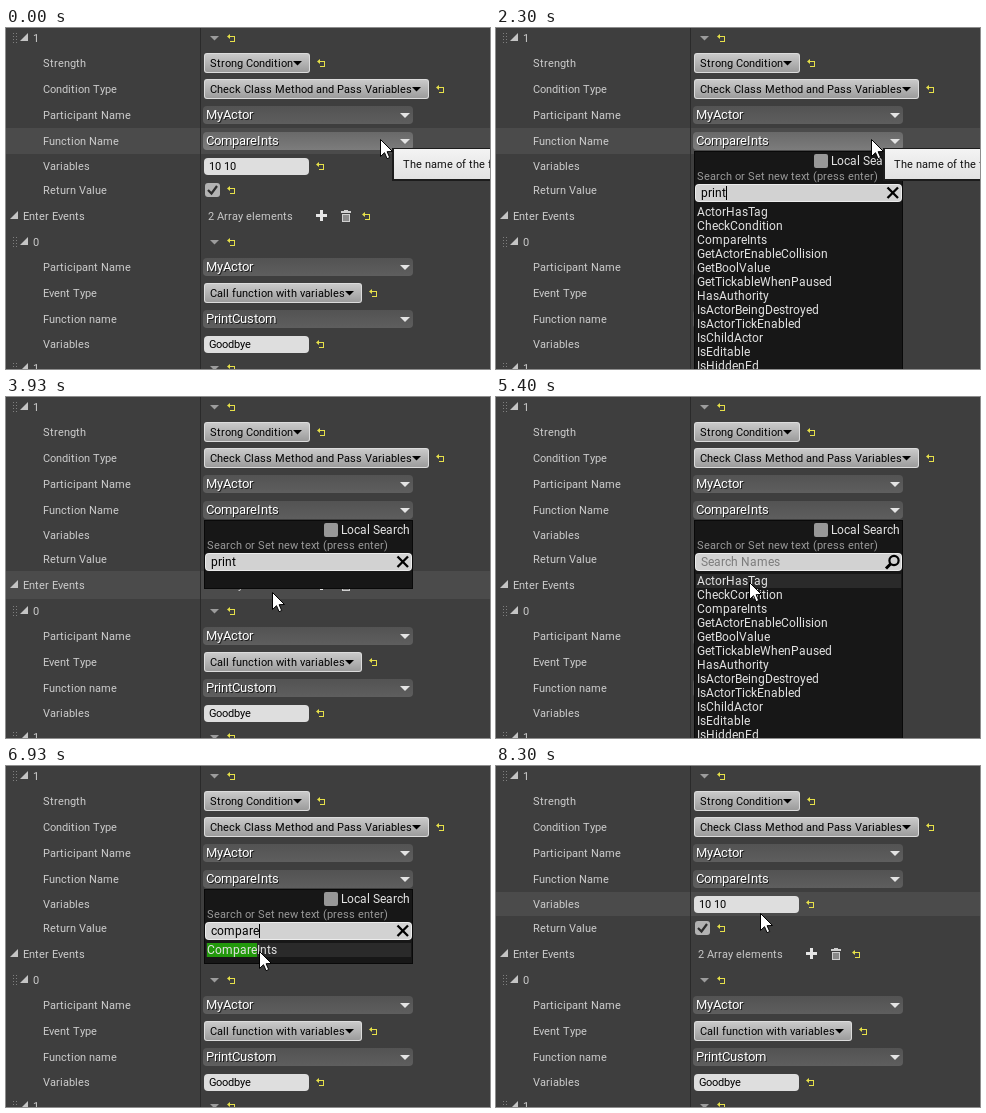
Animation, 484 px wide and 341 px high, one loop 8.66 s. Source, as an HTML page with a canvas:

```html
<!DOCTYPE html>
<html lang="en">
<head>
<meta charset="utf-8">
<title>Searchable function picker</title>
<style>
  html, body { margin: 0; width: 100%; height: 100%; overflow: hidden; background: #3e3e3e; }
  canvas { display: block; }
</style>
</head>
<body>
<canvas id="stage" width="484" height="341"></canvas>
<script>
const LOOP = 8660, W = 484, H = 341;
const ctx = document.getElementById('stage').getContext('2d');

const rowHeight = { header: 24, button: 26, combo: 26, input: 24, check: 24, array: 28 };
const indent = { header: 27, array: 17 };
const rows = [
  ['header', '1'],
  ['button', 'Strength', 'Strong Condition'],
  ['button', 'Condition Type', 'Check Class Method and Pass Variables'],
  ['combo', 'Participant Name', 'MyActor'],
  ['combo', 'Function Name', 'CompareInts'],
  ['input', 'Variables', '10 10'],
  ['check', 'Return Value'],
  ['array', 'Enter Events', '2 Array elements'],
  ['header', '0'],
  ['combo', 'Participant Name', 'MyActor'],
  ['button', 'Event Type', 'Call function with variables'],
  ['combo', 'Function name', 'PrintCustom'],
  ['input', 'Variables', 'Goodbye'],
  ['header', '1']
].map(([kind, label, value]) => ({ kind, label, value, h: rowHeight[kind] }));
rows.reduce((top, row) => {
  row.top = top;
  row.mid = top + row.h / 2;
  return top + row.h;
}, -2);

const items = ['ActorHasTag', 'CheckCondition', 'CompareInts', 'GetActorEnableCollision',
  'GetBoolValue', 'GetTickableWhenPaused', 'HasAuthority', 'IsActorBeingDestroyed',
  'IsActorTickEnabled', 'IsChildActor', 'IsEditable', 'IsHiddenEd'];

const within = (t, a, b) => t >= a && t < b;
const keysHit = (t, start, gap) => Math.max(0, 1 + Math.floor((t - start) / gap));

// What the search box holds: typed, deleted, typed again
function queryAt(t) {
  if (t < 1970) return 'CompareInts';
  if (t < 4600) return 'print'.slice(0, keysHit(t, 1970, 82));
  if (t < 5670) return 'print'.slice(0, Math.max(0, 5 - keysHit(t, 4600, 132)));
  return 'compare'.slice(0, keysHit(t, 5670, 83));
}
// The list follows the search box after a pause
const filterAt = t => within(t, 2570, 5370) ? 'print' : t >= 6400 ? 'compare' : '';
const caretAt = t => !within(t, 1370, 1870) && !within(t, 3100, 4600) && !within(t, 6400, 6900);

// Pointer stops: time, x, y
const path = [[0, 374, 111], [170, 374, 111], [270, 375, 111], [3400, 375, 111], [3770, 290, 216],
  [3930, 266, 195], [4230, 253, 185], [7500, 253, 185], [7870, 232, 106], [8300, 264, 147],
  [LOOP, 264, 147]];

function pointer(t) {
  const i = path.findIndex(p => p[0] > t);
  const [a, b] = [path[i - 1], path[i]];
  const k = (t - a[0]) / (b[0] - a[0]);
  const eased = k * k * (3 - 2 * k);
  return [1, 2].map(n => Math.round(a[n] + (b[n] - a[n]) * eased));
}

// Text is set on whole pixels with rounded kerning, as the editor does
const font = size => size + 'px Roboto, Arial, sans-serif';
const widths = {};
function em(s) {
  if (!(s in widths)) {
    ctx.font = font(100);
    widths[s] = ctx.measureText(s).width / 100;
  }
  return widths[s];
}
function advance(c, next, size) {
  const kern = next ? Math.round((em(c + next) - em(c) - em(next)) * size) : 0;
  return Math.floor(em(c) * size + 0.48) + kern;
}
const textWidth = (s, size) => [...s].reduce((w, c, i) => w + advance(c, s[i + 1], size), 0);
function text(s, x, y, size, color) {
  [...s].forEach((c, i) => {
    const step = advance(c, s[i + 1], size);
    ctx.font = font(size);
    ctx.fillStyle = color;
    ctx.fillText(c, x, y);
    x += step;
  });
}

function rect(x, y, w, h, color) {
  ctx.fillStyle = color;
  ctx.fillRect(x, y, w, h);
}
function round(x, y, w, h, r, color) {
  ctx.fillStyle = color;
  ctx.beginPath();
  ctx.roundRect(x, y, w, h, r);
  ctx.fill();
}
function trace(points) {
  ctx.beginPath();
  points.forEach(p => ctx.lineTo(p[0], p[1]));
}
function poly(points, color) {
  trace(points);
  ctx.closePath();
  ctx.fillStyle = color;
  ctx.fill();
}
function line(points, width, color) {
  trace(points);
  ctx.strokeStyle = color;
  ctx.lineWidth = width;
  ctx.stroke();
}
function shade(y, h, top, bottom) {
  const g = ctx.createLinearGradient(0, y, 0, y + h);
  g.addColorStop(0, top);
  g.addColorStop(1, bottom);
  return g;
}

const downArrow = (x, y, w, color) => poly([[x, y], [x + w, y], [x + w / 2, y + w / 2]], color);
const expander = (x, y) => poly([[x + 8, y - 5], [x + 8, y + 3], [x, y + 3]], '#c4c4c4');

function grip(y) {
  for (let i = 0; i < 8; i++) rect(7 + 3 * (i % 2), y - 5 + 3 * (i >> 1), 1, 1, '#808080');
}

function resetIcon(x, y) {
  const c = '#e6e04a';
  rect(x + 2, y - 2, 6, 1, c);
  rect(x + 7, y - 2, 1, 6, c);
  rect(x + 3, y + 3, 5, 1, c);
  poly([[x, y - 1.5], [x + 3, y - 4], [x + 3, y + 1]], c);
}

// Each control draws itself and returns its right edge
const controls = {
  header({ mid }) {
    downArrow(204, mid - 2, 9, '#9c9c9c');
    return 214;
  },
  button({ mid, value }) {
    const w = textWidth(value, 11) + 23;
    round(198, mid - 10, w, 20, 3, '#dcdcdc');
    round(199, mid - 9, w - 2, 18, 2, shade(mid - 9, 18, '#cacaca', '#9c9c9c'));
    text(value, 204, mid + 4, 11, '#000');
    downArrow(198 + w - 17, mid - 2, 9, '#000');
    return 198 + w;
  },
  combo({ mid, value }, hot) {
    round(197, mid - 9, 210, 18, 4,
      hot ? shade(mid - 9, 18, '#696969', '#7c7c7c') : shade(mid - 9, 18, '#535353', '#5e5e5e'));
    text(value, 201, mid + 5, 13, '#1a1a1a');
    text(value, 200, mid + 4, 13, '#fff');
    downArrow(394, mid - 2, 10, '#e4e4e4');
  },
  input({ mid, value }) {
    round(198, mid - 8, 105, 17, 4, '#dedede');
    text(value, 203, mid + 4, 11, '#000');
    return 303;
  },
  check({ mid }) {
    round(199, mid - 7, 15, 14, 3, '#b2b2b2');
    line([[202, mid], [205.5, mid + 3.5], [211, mid - 4]], 2.2, '#2c2c2c');
    return 214;
  },
  array({ mid, value }) {
    text(value, 202, mid + 4, 11, '#c8c8c8');
    rect(310, mid - 2, 11, 3, '#e6e6e6');
    rect(314, mid - 6, 3, 11, '#e6e6e6');
    rect(338, mid - 6, 4, 1, '#cfcfcf');
    rect(335, mid - 5, 10, 2, '#cfcfcf');
    rect(336, mid - 2, 8, 8, '#cfcfcf');
    for (let x = 337.5; x < 343; x += 2) rect(x, mid - 1, 1, 6, '#444');
    return 349;
  }
};

function details(px, py, covered) {
  rect(0, 0, W, H, '#3e3e3e');
  for (const row of rows) {
    const { kind, label, top, mid, h } = row;
    const over = !covered && within(py, top, top + h);
    const x = indent[kind] || 37;
    if (over) rect(0, top, W, h, '#4b4b4b');
    if (kind === 'header') grip(mid);
    if (x < 37) expander(x - 13, mid);
    text(label, x, mid + 4, 11, '#cccccc');
    const hot = over && within(px, 197, 407) && Math.abs(py - mid) < 9;
    const right = controls[kind](row, hot);
    if (right) resetIcon(right + 7, mid);
  }
  rect(194, 0, 1, H, '#2a2a2a');
}

function listItem(name, y, query, hot) {
  if (hot) rect(200, y, 205, 14, '#2a2a2a');
  if (query) {
    const low = name.toLowerCase(), q = query.toLowerCase();
    for (let i = low.indexOf(q); i >= 0; i = low.indexOf(q, i + q.length)) {
      const x = 201 + textWidth(name.slice(0, i), 12);
      rect(x, y, textWidth(name.substr(i, q.length), 12), 14, '#22980c');
    }
  }
  text(name, 201, y + 11, 12, '#e2e2e2');
}

function searchBox(query, caret) {
  round(199, 156, 207, 18, 4, '#ececec');
  round(200, 157, 205, 16, 3, '#d2d2d2');
  if (query) {
    text(query, 205, 169, 12, '#000');
    line([[391.5, 159.5], [402, 170]], 2.3, '#000');
    line([[402, 159.5], [391.5, 170]], 2.3, '#000');
    if (caret) rect(205 + textWidth(query, 12), 158, 1, 14, '#000');
  } else {
    text('Search Names', 205, 169, 12, '#7c7c7c');
    line([[395, 166.5], [390, 171.5]], 3, '#000');
    ctx.lineWidth = 2.2;
    ctx.beginPath();
    ctx.arc(398, 163.5, 4.6, 0, 7);
    ctx.stroke();
  }
}

function menu(t, list, bottom, px, py) {
  const query = queryAt(t);
  rect(198, 123, 209, bottom - 123, '#090909');
  rect(199, 124, 207, bottom - 125, '#171717');
  round(318, 126, 14, 14, 2, '#989898');
  text('Local Search', 335, 137, 12, '#e4e4e4');
  text('Search or Set new text (press enter)', 201, 152, 11, '#999');
  searchBox(query, caretAt(t));
  list.forEach((name, i) => {
    const y = 177 + 14 * i;
    listItem(name, y, query, within(px, 199, 406) && within(py, y, y + 14));
  });
}

function tooltip(px, py) {
  const x = px + 12, y = py + 9;
  rect(x, y, W, 33, '#1c1c1c');
  rect(x + 2, y + 1, W, 30, shade(y, 30, '#f4f4f4', '#e2e2e2'));
  text('The name of the function', x + 11, y + 20, 11, '#111');
}

function cursor(x, y) {
  const shape = [[0, 0], [0, 17], [4, 13.2], [6.6, 19.2], [9.2, 18], [6.6, 12.2], [12, 12]]
    .map(p => [x + p[0] + 0.5, y + p[1] + 0.5]);
  poly(shape, '#fff');
  ctx.strokeStyle = '#000';
  ctx.lineWidth = 1;
  ctx.stroke();
}

function draw(t) {
  const [px, py] = pointer(t);
  const open = within(t, 930, 7230);
  const list = items.filter(name => name.toLowerCase().includes(filterAt(t)));
  const bottom = Math.max(192, 184 + 14 * list.length);
  const covered = open && within(px, 198, 407) && within(py, 123, bottom);
  details(px, py, covered);
  if (open) menu(t, list, bottom, px, py);
  if (t < 3400) tooltip(px, py);
  cursor(px, py);
}

const start = performance.now();
function tick() {
  draw((performance.now() - start) % LOOP);
  requestAnimationFrame(tick);
}
tick();
</script>
</body>
</html>
```
